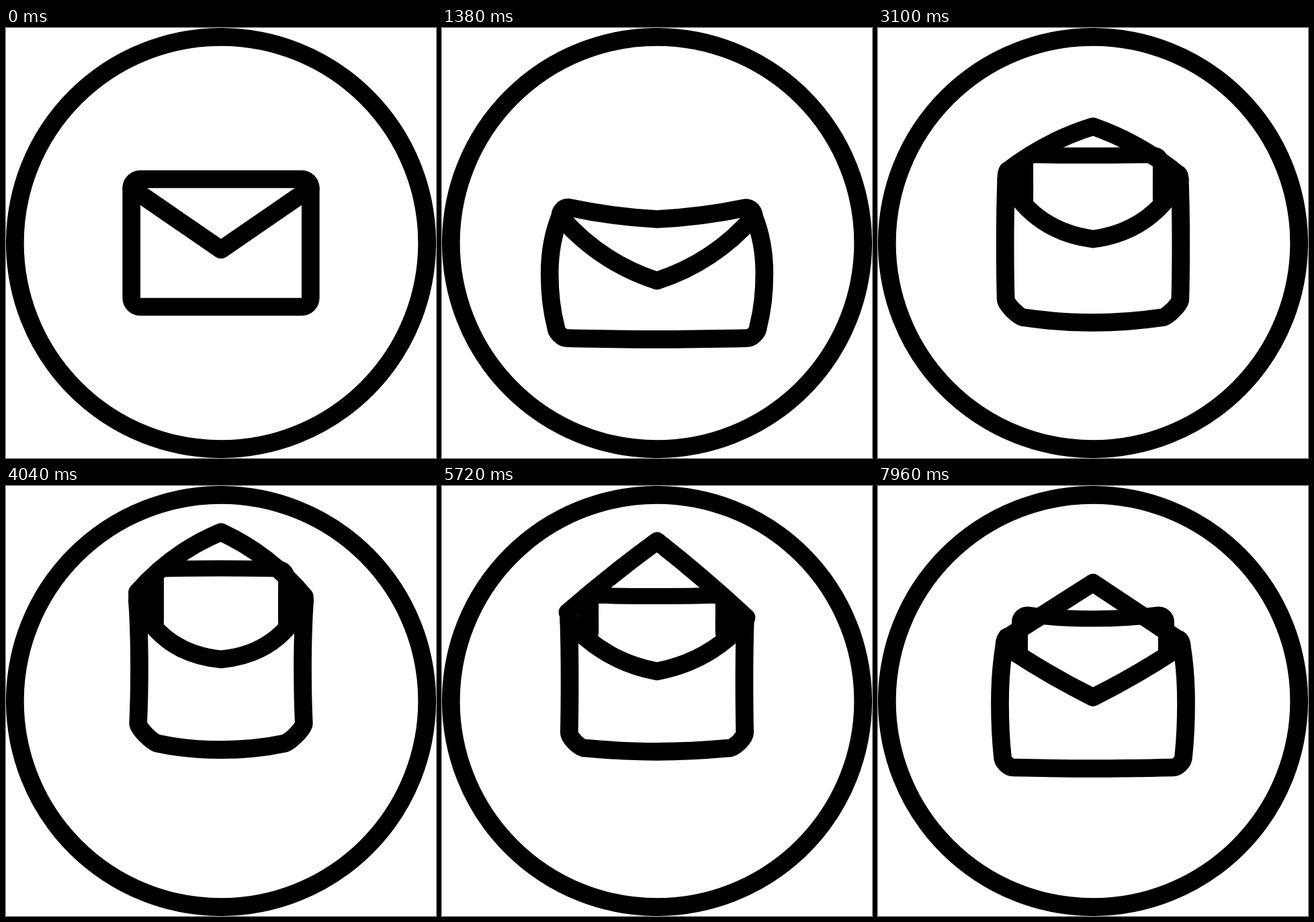
Animation of 640x640 px, one loop 8000 ms. Source, as an HTML page:

```html
<!DOCTYPE html>
<html lang="en">
<head>
<meta charset="utf-8">
<title>Envelope</title>
<style>
html, body { margin: 0; width: 100%; height: 100%; overflow: hidden; background: #fff; }
svg { display: block; width: 100%; height: 100%; }
</style>
</head>
<body>
<svg viewBox="0 0 640 640" fill="none" stroke="#000" stroke-width="26.67" stroke-linecap="round" stroke-linejoin="round">
  <circle cx="320" cy="320" r="306.67"/>
  <path id="body"/>
  <path id="pocket"/>
  <g id="sheet">
    <path id="letter" stroke-width="24"/>
    <path id="edges"/>
  </g>
</svg>
<script>
const LOOP = 8000, STEP = 112, MID = 320, ROUND = .55;
const BEATS = [0, 2400, 4400, 6500, 7960]; // closed, sunk, peak, landed, settled
const $ = id => document.getElementById(id);

const out = n => u => 1 - (1 - u) ** n;
const sink = out(2.4), climb = out(1.35), snap = out(4), relax = out(2.3);
const fall = u => u ** 4;
const swing = u => (1 - Math.cos(1.2 * Math.PI * u)) / (1 - Math.cos(1.2 * Math.PI));

// Returns a function that eases one quantity through its values at the beats
function mover(t) {
  const i = Math.max(0, BEATS.findLastIndex((b, n) => b <= t && n < BEATS.length - 1));
  const u = Math.min(1, (t - BEATS[i]) / (BEATS[i + 1] - BEATS[i]));
  return (values, { up = snap, down = relax } = {}) => {
    const w = [sink, up, down, swing][i](u);
    return values[i] + (values[i + 1] - values[i]) * w;
  };
}

const flip = x => 2 * MID - x;
const fmt = (cmd, ...n) => cmd + n.map(v => v.toFixed(2)).join(' ');

// Rounded corner from (x0,y0) to (x1,y1) around (cx,cy)
const corner = (x0, y0, x1, y1, cx, cy, k = ROUND) =>
  fmt('C', x0 + (cx - x0) * k, y0 + (cy - y0) * k, x1 + (cx - x1) * k, y1 + (cy - y1) * k, x1, y1);

// Control point of a curve bowed upwards from its chord
function bowed(x0, y0, x1, y1, bow) {
  const dx = x1 - x0, dy = y1 - y0, s = bow / Math.hypot(dx, dy);
  return [(x0 + x1) / 2 + dy * s, (y0 + y1) / 2 - dx * s];
}

function draw(t) {
  const move = mover(t), heavy = { down: fall };

  const base = move([415, 469, 374, 477, 419], { up: climb, down: fall });
  const half = move([133.3, 146, 124.5, 132, 132]);
  const height = move([176.7, 182, 212, 186, 181.5]);
  const bulge = move([0, 18, -3, 8, 6.5], heavy);
  const cut = move([13.3, 17, 30, 22, 16]);
  const lip = move([13.3, 12, 0, -2, 6]);
  const apex = base - move([190, 175, 315, 271, 275], heavy);
  const arch = move([0, -6, 18, 2, 0]);
  const tip = base - move([85, 85.5, 125.5, 113, 104.5]);
  const dip = move([0, 28, 43, 24, 5]);

  const ax = MID - half, ay = base - height;
  const tx = ax + lip, ty = ay - 13.3, ry = ty + (13.3 - lip) / 2;
  const sx = ax - bulge, sy = base - .53 * height;
  const bx = ax - .4 * bulge, by = base - cut, cx = bx + cut;
  const up = ay + (sy - ay) * .45, down = by + (sy - by) * .45;
  const bottom = base + (cut - 13.3) * .55, k = 7.3 / cut;
  const [px, py] = bowed(tx, ty, MID, apex, arch);
  const [qx, qy] = bowed(MID, apex, flip(tx), ry, arch);
  const [vx, vy] = bowed(ax, ay, MID, tip, -dip);

  $('body').setAttribute('d', fmt('M', ax, ay)
    + corner(ax, ay, tx, ty, ax, ty)
    + fmt('Q', px, py, MID, apex)
    + fmt('Q', qx, qy, flip(tx), ry)
    + corner(flip(tx), ry, flip(ax), ay, flip(ax), ry)
    + fmt('Q', flip(sx), up, flip(sx), sy)
    + fmt('Q', flip(sx), down, flip(bx), by)
    + corner(flip(bx), by, flip(cx), base, flip(bx), base, k)
    + fmt('Q', MID + 50, bottom, MID, bottom)
    + fmt('Q', MID - 50, bottom, cx, base)
    + corner(cx, base, bx, by, bx, base, k)
    + fmt('Q', sx, down, sx, sy)
    + fmt('Q', sx, up, ax, ay) + 'Z');

  $('pocket').setAttribute('d', fmt('M', ax, ay) + fmt('Q', vx, vy, MID, tip)
    + fmt('Q', flip(vx), vy, flip(ax), ay));

  // The letter slides out of the pocket, its sides growing as it rises
  const rise = move([177, 177, 260, 223.5, 227.5]);
  const fold = move([7, 7, -1, 13, 6], heavy);
  const edge = move([17, 17, 35, 23, 23], heavy);
  const ly = base - rise, end = ly + .7 * (rise - 147);
  const lx = 188 + edge, r = 11, mx = 200 + edge / 2;
  const head = Math.min(ly + 38, end), foot = Math.max(head, end + 12 - edge / 2);

  $('letter').setAttribute('d', fmt('M', lx, end) + fmt('L', lx, ly + r)
    + corner(lx, ly + r, lx + r, ly, lx, ly)
    + fmt('Q', MID - 52, ly + fold, MID, ly + fold)
    + fmt('Q', MID + 52, ly + fold, flip(lx + r), ly)
    + corner(flip(lx + r), ly, flip(lx), ly + r, flip(lx), ly)
    + fmt('L', flip(lx), end));
  $('edges').setAttribute('d', [mx, flip(mx)].map(x => fmt('M', x, head) + fmt('L', x, foot)).join(''));
  $('edges').setAttribute('stroke-width', edge);
  $('sheet').style.display = t > BEATS[1] ? '' : 'none';
}

const start = performance.now();
function tick() {
  const t = (performance.now() - start) % LOOP;
  const n = Math.floor((t - 104) / STEP);
  draw(n < 0 ? 0 : 120 + n * STEP);
  requestAnimationFrame(tick);
}
tick();
</script>
</body>
</html>
```
